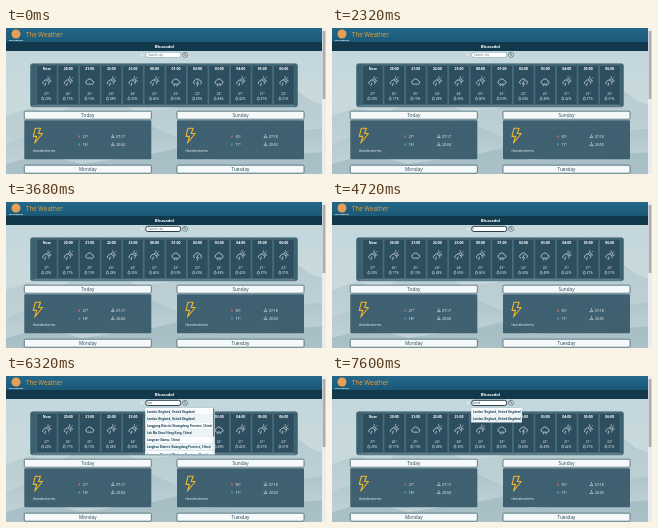
These frames come from a looping animation (320 px wide and 146 px high, 8000 ms). An HTML page:

```html
<!DOCTYPE html>
<html lang="en">
<head>
<meta charset="utf-8">
<title>Weather</title>
<style>
html, body { margin: 0; width: 100%; height: 100%; overflow: hidden; background: #c6d8dc; }
svg { display: block; width: 100vw; height: 100vh; }
text { font-family: "Open Sans", "Noto Sans", sans-serif; }
</style>
</head>
<body>
<svg id="stage" viewBox="0 0 320 146" preserveAspectRatio="none">
  <defs>
    <linearGradient id="sky" x1="0" y1="0" x2="0" y2="1">
      <stop offset="0" stop-color="#bfd5dc"/><stop offset=".5" stop-color="#c9dadd"/><stop offset="1" stop-color="#c3d5d9"/>
    </linearGradient>
    <linearGradient id="head" x1="0" y1="0" x2="0" y2="1">
      <stop offset="0" stop-color="#24688a"/><stop offset="1" stop-color="#1b5876"/>
    </linearGradient>
    <linearGradient id="hill" x1="0" y1="0" x2="0" y2="1">
      <stop offset="0" stop-color="#a9c0c7"/><stop offset="1" stop-color="#c4d5d9"/>
    </linearGradient>
  </defs>
  <rect width="320" height="146" fill="url(#sky)"/>
  <path d="M0 88L24 80 52 86 88 66 108 72 132 84 166 80 196 70 226 78 262 68 288 60 304 72 320 78V146H0Z" fill="url(#hill)" opacity=".6"/>
  <path d="M0 116L26 106 54 114 100 104 134 92 154 102 178 112 216 104 252 92 284 104 320 100V146H0Z" fill="url(#hill)" opacity=".8"/>
  <path d="M0 136L36 126 76 136 146 126 172 120 198 132 262 128 320 124V146H0Z" fill="#9bb4bd" opacity=".6"/>
  <g id="page"></g>
  <g id="search"></g>
</svg>
<script>
const page = document.getElementById("page");
const search = document.getElementById("search");

function add(parent, tag, attrs, content = "") {
  const el = document.createElementNS("http://www.w3.org/2000/svg", tag);
  for (const key in attrs) el.setAttribute(key, attrs[key]);
  el.textContent = content;
  parent.append(el);
  return el;
}
const rect = (parent, x, y, width, height, fill, more) =>
  add(parent, "rect", { x, y, width, height, fill, ...more });
const label = (parent, x, y, size, fill, content, more) =>
  add(parent, "text", { x, y, "font-size": size, fill, ...more }, content);
const line = (parent, d, stroke = "#fff", width = .6) =>
  add(parent, "path", { d, stroke, fill: "none", "stroke-width": width, "stroke-linecap": "round", "stroke-linejoin": "round" });
const centre = { "text-anchor": "middle" };
const bold = { "font-weight": 700 };

function drawHeader() {
  rect(page, 0, 0, 316, 14, "url(#head)");
  rect(page, 0, 14, 316, 9, "#12384b");
  add(page, "circle", { cx: 10, cy: 6, r: 4.5, fill: "#e4a05a" });
  label(page, 10, 13, 2.3, "#fff", "The Weather", { ...centre, ...bold });
  label(page, 20, 9.2, 6.2, "#e9a13b", "The Weather");
  label(page, 158.5, 20.2, 4.2, "#fff", "Bhusadol", { ...centre, ...bold });
  rect(page, 316, 0, 4, 146, "#e9edef");
  rect(page, 316.6, 3, 2.8, 68, "#a9adb0");
}

function drawIcon(x, kind) {
  const cloud = `M${x - 3} 56a1.8 1.8 0 0 1 .2-3.4a2.7 2.7 0 0 1 5.1 .2a1.7 1.7 0 0 1 .7 3.2`;
  if (kind === "cloud") return line(page, cloud + "Z");
  if (kind === "storm") {
    line(page, cloud);
    return line(page, `M${x + .5} 53l-1.5 2.7h1.8l-1.3 2.5`);
  }
  if (kind === "rain") {
    line(page, cloud + "Z");
    return line(page, `M${x - 1.3} 57l-.4 1M${x + 1.2} 57l-.4 1`);
  }
  // Sun behind a cloud with drops
  line(page, `M${x - 3.5} 56a1.5 1.5 0 0 1 .7-2.6a2.1 2.1 0 0 1 4 0a1.4 1.4 0 0 1 .6 2.6`);
  line(page, `M${x} 51.3a1.7 1.7 0 0 1 2.6 2.2M${x + 1.4} 49.3v-.7M${x + 3.6} 50.2l.5-.5M${x + 3.8} 53h.6M${x - 1} 55l-.8 2.6`);
}

function drawHours() {
  rect(page, 24.5, 35.8, 267, 43, "#3c6070", { rx: 2, stroke: "#557987", "stroke-width": .8 });
  const names = ["Now", "20:00", "21:00", "22:00", "23:00", "00:00", "01:00", "02:00", "03:00", "04:00", "05:00", "06:00"];
  const temps = [27, 26, 25, 24, 24, 23, 23, 22, 22, 21, 21, 22];
  const wet = [20, 17, 15, 28, 35, 46, 53, 60, 49, 42, 37, 31];
  const icons = { 2: "cloud", 6: "rain", 7: "storm", 8: "rain" };
  names.forEach((name, i) => {
    const x = 40.7 + i * 21.56;
    rect(page, x - 10.3, 37.2, 20.7, 39.5, "#2d4e5e", { rx: .7, stroke: "#668591", "stroke-width": .45 });
    label(page, x, 42, 3.5, "#fff", name, { ...centre, ...bold });
    drawIcon(x, icons[i]);
    label(page, x, 66.8, 3.2, "#fff", temps[i] + "°", centre);
    add(page, "path", { d: `M${x - 4} 68.8q-2.2 3 0 3.2q2.2-.2 0-3.2`, fill: "none", stroke: "#e2eef2", "stroke-width": .5 });
    label(page, x + 1.4, 71.9, 3.2, "#fff", wet[i] + "%", centre);
  });
  rect(page, 27, 77.2, 262, .7, "#6d8b96");
}

function drawDay(x, y, name, high, low, rise, set, note) {
  rect(page, x, y, 127, 8, "#f5f9fa", { rx: 1, stroke: "#315565", "stroke-width": .7 });
  label(page, x + 63.5, y + 5.7, 4.7, "#24475a", name, centre);
  rect(page, x, y + 9, 127, 39, "#2f5363", { rx: 1, opacity: .88 });
  if (!note) return;
  line(page, `M${x + 11} ${y + 17}h5.2l-2 5.3h4l-7.7 9.5 2-6.6h-3.5Z`, "#efb62f", 1.1);
  label(page, x + 8.5, y + 40.3, 3.2, "#fff", note);
  [[high, rise, "#d96552"], [low, set, "#4b9bd0"]].forEach(([temp, time, color], row) => {
    const top = y + 24 + row * 8;
    rect(page, x + 54.2, top, 1.5, 2.5, color, { rx: .7 });
    label(page, x + 58.5, top + 2.8, 3.4, "#fff", temp + "°");
    line(page, `M${x + 87} ${top + 2.4}h3m-2.5-.7a1 1 0 0 1 2 0m-1-1.8v-.7`, "#eef5f7", .5);
    label(page, x + 92, top + 2.8, 3.4, "#fff", time);
  });
}

function drawList(names, width, height) {
  const group = add(search, "g", {});
  rect(group, 139.3, 32, width, height, "#f4f8fa", { stroke: "#9eb7c1", "stroke-width": .4 });
  const view = add(group, "svg", { x: 139.3, y: 32, width, height });
  names.forEach((name, i) => {
    const y = i * 7.15;
    rect(view, 0, y, width, 7, i % 2 ? "#edf4f6" : "#fafcfd");
    rect(view, 0, y + 6.8, width, .35, "#acc5cf");
    label(view, 1.6, y + 4.7, 2.8, "#183f51", name, bold);
  });
  if (height > 20) {
    rect(group, 206.8, 32, 1.8, height, "#dfe7ea");
    rect(group, 207, 32.5, 1.4, 28, "#528197");
  }
  return group;
}

drawHeader();
drawHours();
drawDay(18.3, 83.2, "Today", 27, 18, "07:17", "20:04", "thunderstorms");
drawDay(171, 83.2, "Sunday", 30, 17, "07:18", "20:03", "thunderstorms");
drawDay(18.3, 137.2, "Monday");
drawDay(171, 137.2, "Tuesday");

line(search, "M136 25.4v2.8M134.6 26.8h2.8", "#e9f2f5", .7);
const box = rect(search, 139.8, 24.3, 34.8, 5.2, "#fff", { rx: 2 });
const hint = label(search, 142, 28, 3, "#526570", "Search city");
const typed = label(search, 141.3, 28.1, 3.2, "#193645", "");
add(search, "circle", { cx: 179, cy: 26.8, r: 2.5, fill: "#f1f6f8", stroke: "#294956", "stroke-width": .6 });
add(search, "circle", { cx: 178.7, cy: 26.4, r: .9, fill: "none", stroke: "#294956", "stroke-width": .55 });
line(search, "M179.4 27.1l.9 .9", "#294956", .6);

const london = "London (England, United Kingdom)";
const fullList = drawList([
  london, london,
  "Longgang District (Guangdong Province, China)",
  "Lok Ma Chau (Hong Kong, China)",
  "Longnan (Gansu, China)",
  "Longhua District (Guangdong Province, China)",
  "Longwan District (Zhejiang Province, China)"
], 69.3, 46.3);
const shortList = drawList([london, london], 50.5, 14.3);

const focusAt = 2400, clearAt = 4000, listAt = 5120, filterAt = 6640;
const words = [[0, ""], [4720, "l"], [4880, "lo"], [5040, "lon"], [6480, "lond"]];
const show = (el, on) => el.setAttribute("visibility", on ? "visible" : "hidden");

function draw(now) {
  const t = now % 8000;
  const focused = t >= focusAt;
  typed.textContent = words.findLast(([start]) => start <= t)[1];
  box.setAttribute("stroke", focused ? "#152c38" : "#739ba9");
  box.setAttribute("stroke-width", focused ? .9 : .5);
  show(hint, t < clearAt);
  show(fullList, t >= listAt && t < filterAt);
  show(shortList, t >= filterAt);
}

const started = performance.now();
function tick() {
  draw(performance.now() - started);
  requestAnimationFrame(tick);
}
tick();
</script>
</body>
</html>
```
